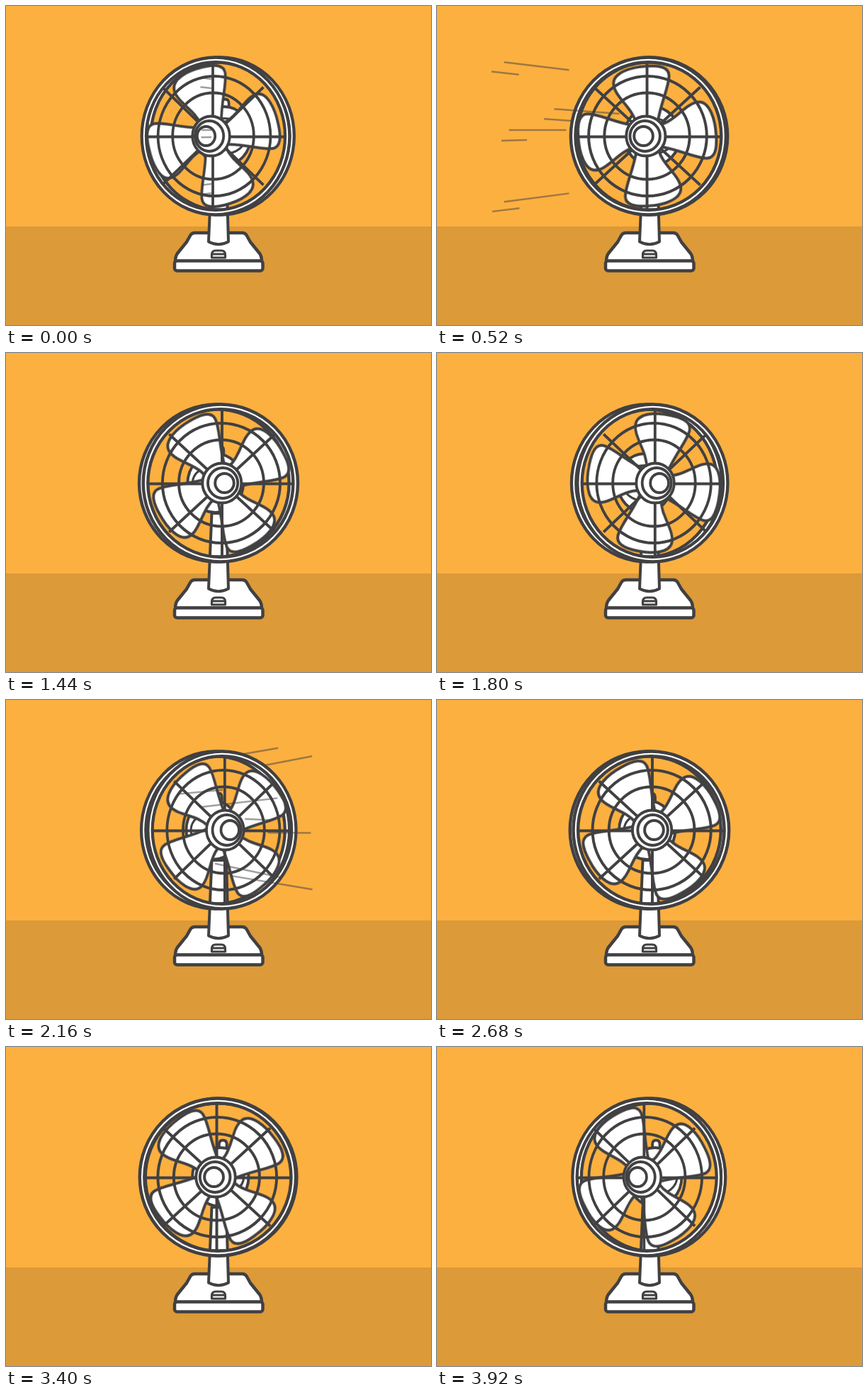
Recreate the animation shown at these times as an HTML page without scripts. Size 600 by 450 pixels, loop 3960 ms.

```html
<!DOCTYPE html>
<html lang="en">
<head>
<meta charset="utf-8">
<title>Desk fan</title>
<style>
  /* --s is the turn of the head: -1 faces left, 1 faces right */
  @property --s { syntax: "<number>"; inherits: true; initial-value: -1; }

  html, body { margin: 0; width: 100%; height: 100%; overflow: hidden; background: #fcb040; }
  svg { display: block; width: 600px; height: 450px; }

  .ink { fill: none; stroke: #414042; stroke-width: 4px; stroke-linejoin: round; }
  .bold { stroke-width: 4.5px; }
  .fine { stroke-width: 3.2px; }
  .white { fill: #fff; }

  .head { animation: turn 3960ms linear infinite; }
  .layer {
    transform:
      translate(calc((var(--x) + var(--k) * var(--s)) * 1px), 183.5px)
      scaleX(calc(1 - .06 * var(--s) * var(--s)));
  }
  .blades { animation: spin 990ms linear infinite; }

  .wind path {
    fill: none; stroke: #414042; stroke-width: 2.5; stroke-opacity: .5;
    stroke-dasharray: var(--len) 300px;
    animation: gust-right 3960ms linear -2040ms infinite;
  }
  .wind .long { --len: 43px; animation: gust-long 3960ms linear -40ms infinite; }
  .wind .short { --len: 18px; animation: gust-short 3960ms linear -40ms infinite; }
  .wind .late { animation-delay: var(--delay); }

  @keyframes turn {
    0% { --s: -1; }
    3% { --s: -.94; }
    13.1% { --s: -.47; }
    36.4% { --s: .53; }
    48% { --s: .95; }
    52% { --s: 1; }
    55% { --s: .98; }
    58% { --s: .88; }
    67.7% { --s: .41; }
    85.9% { --s: -.35; }
    97% { --s: -.88; }
    100% { --s: -1; }
  }
  @keyframes spin { from { transform: rotate(-13deg); } to { transform: rotate(347deg); } }
  @keyframes gust-long { from { stroke-dashoffset: var(--len); } 22.1%, to { stroke-dashoffset: -100px; } }
  @keyframes gust-short { from { stroke-dashoffset: var(--len); } 16.8%, to { stroke-dashoffset: -100px; } }
  @keyframes gust-right { from { stroke-dashoffset: var(--len); } 14.1%, to { stroke-dashoffset: -100px; } }
</style>
</head>
<body>
<svg viewBox="0 0 600 450">
  <defs>
    <g id="ring">
      <circle r="107.700" fill="none" stroke="#fff" stroke-width="6"/>
      <circle class="ink bold" r="111"/>
      <circle class="ink bold" r="104.300"/>
    </g>
    <path id="blade" class="ink white" d="M-15-20C-19-42-43-58-43.5-76C-43.5-92-18-98.5 4-98.5C24-99 37-95 36.5-83C35-66 23-48 16-18Z"/>
  </defs>

  <rect width="600" height="311" fill="#fcb040"/>
  <rect y="311" width="600" height="139" fill="#dc9a38"/>

  <!-- base and post -->
  <g class="ink white">
    <path class="bold" d="M267 320H333Q338 320 340 324L345 333L358 349Q361 353 361 360H239Q239 353 242 349L255 333L260 324Q262 320 267 320Z"/>
    <rect class="bold" x="238" y="359.500" width="124.500" height="14" rx="3.500"/>
    <path class="fine" d="M290.500 355V351Q290.500 345 296 345H304Q309.500 345 309.500 351V355ZM290.500 350H309.500"/>
    <path d="M290.500 226L286 332.500Q300 340 314 332.500L311 226Z"/>
  </g>

  <g class="head">
    <g class="layer" style="--x:299;--k:-3.5"><use href="#ring"/></g>

    <!-- motor housing -->
    <g class="layer" style="--x:304.500;--k:-5">
      <path class="ink white" d="M-5.500-38V-46Q-5.500-52 0-52Q5.500-52 5.500-46V-38Z"/>
    </g>
    <g class="layer" style="--x:300;--k:-8">
      <ellipse class="ink white" rx="40" ry="41.500"/>
      <ellipse class="ink fine" rx="33" ry="25"/>
    </g>

    <g class="layer" style="--x:300;--k:7">
      <g class="blades">
        <use href="#blade"/>
        <use href="#blade" transform="rotate(90)"/>
        <use href="#blade" transform="rotate(180)"/>
        <use href="#blade" transform="rotate(270)"/>
      </g>
    </g>

    <!-- wire guard -->
    <g class="layer" style="--x:300.500;--k:6.500"><circle class="ink" r="84.500"/></g>
    <g class="layer" style="--x:300;--k:7.500"><circle class="ink" r="61"/></g>
    <g class="layer" style="--x:300.500;--k:8.500">
      <path class="ink" d="M0-104V104M-76-69L76 69M76-69L-76 69"/>
    </g>
    <g class="layer" style="--x:300.500;--k:4.500">
      <path class="ink" d="M-103 1H103"/>
      <use href="#ring"/>
    </g>

    <!-- hub -->
    <g class="layer" style="--x:299.500;--k:10"><circle class="ink white" r="28"/></g>
    <g class="layer" style="--x:299.500;--k:12.500"><circle class="ink white" r="21.500"/></g>
    <g class="layer" style="--x:299.500;--k:17"><circle class="ink white" r="13.500"/></g>
  </g>

  <g class="wind">
    <path class="long" pathLength="100" d="M290 103L77 77"/>
    <path class="short" pathLength="100" d="M290 116L76 92.500"/>
    <path class="long late" style="--delay:-3795ms" pathLength="100" d="M290 154.500L76 138.500"/>
    <path class="short late" style="--delay:-3805ms" pathLength="100" d="M290 169L76 154"/>
    <path class="long" style="--len:38px" pathLength="100" d="M290 175H77"/>
    <path class="short" pathLength="100" d="M290 185L90 190"/>
    <path class="long" pathLength="100" d="M290 251L77 278.500"/>
    <path class="short" pathLength="100" d="M290 264L77 290"/>

    <path style="--len:29px" pathLength="100" d="M284 85L464 54"/>
    <path style="--len:26px" pathLength="100" d="M294 106L548 57"/>
    <path class="late" style="--len:27px;--delay:-1920ms" pathLength="100" d="M240 133L480 110"/>
    <path class="late" style="--len:38px;--delay:-1985ms" pathLength="100" d="M250 154L540 120"/>
    <path class="late" style="--len:22px;--delay:-2000ms" pathLength="100" d="M300 166L470 174"/>
    <path style="--len:24px" pathLength="100" d="M295 187L548 188"/>
    <path style="--len:40px" pathLength="100" d="M248 221L478 269"/>
    <path style="--len:42px" pathLength="100" d="M264 239L539 285"/>
  </g>
</svg>
</body>
</html>
```
